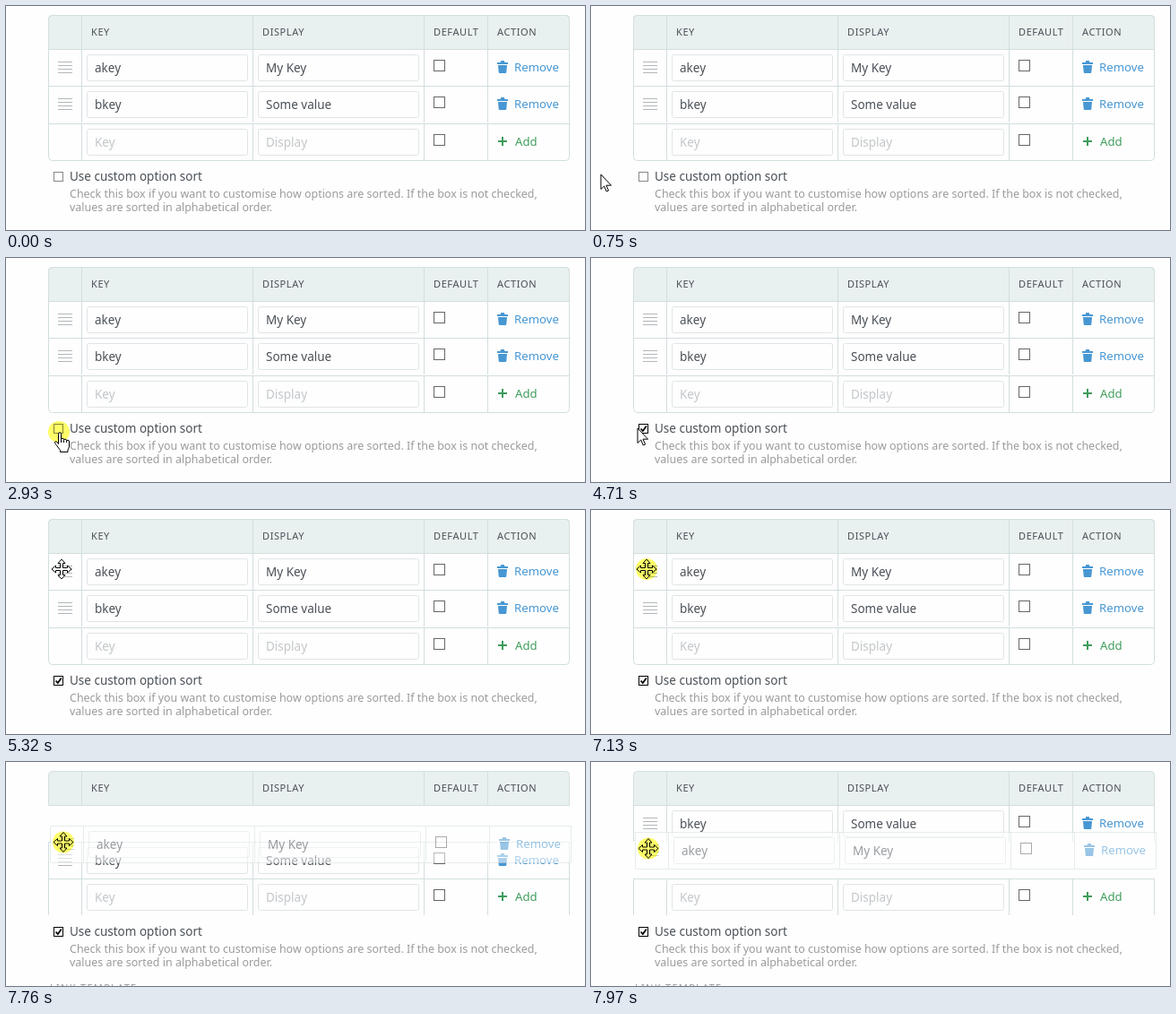
Write an HTML page that moves like this. It is 646x250 px and loops after 8 s.

```html
<!DOCTYPE html>
<html lang="en">
<head>
<meta charset="utf-8">
<title>Sortable options</title>
<style>
html, body { margin: 0; width: 100%; height: 100%; overflow: hidden; background: #fefefe; }
svg { display: block; font: 13.5px "Noto Sans", "Open Sans", sans-serif; fill: #4a5057; }
.line { fill: none; stroke: #d3dedf; }
.head { font-size: 11px; letter-spacing: .6px; }
.field { fill: #fefefe; stroke: #dfe5e6; }
.hint { fill: #c3c7ca; }
.box { fill: #fff; stroke: #666; }
.grip { stroke: #b3b7ba; }
.link { font-size: 13.2px; }
.remove { fill: #4797d3; }
.add { fill: #3f9c5c; }
.help { font-size: 12.48px; fill: #9b9b9b; }
.cursor { fill: #fff; stroke: #000; stroke-linejoin: round; }
#glow { fill: #ffff68; mix-blend-mode: multiply; }
#next { letter-spacing: 1.3px; fill: #999; }
</style>
</head>
<body>
<svg id="stage" width="646" height="250" viewBox="0 0 646 250"></svg>
<script>
const LOOP = 8000;
const COLS = [47.5, 84.5, 275.5, 466.5, 537.5, 628.5];
const $ = id => document.getElementById(id);

const uprights = (xs, top, bottom) => xs.map(x => `M${x} ${top}V${bottom}`).join('');
const field = (x, text, cls) =>
  `<rect class="field" x="${x + .5}" y="6.5" width="179" height="29" rx="2"/>
   <text class="${cls}" x="${x + 9}" y="26">${text}</text>`;

const grip = `<path class="grip" d="M58 14.5h16m-16 4h16m-16 4h16m-16 4h16"/>`;
const removeLink = `<g class="remove link"><path d="M548 15h3.5l.8-2h3.4l.8 2h3.5v2h-12z
  M549 18h10l-.7 8q-.1 1-1.1 1h-6.4q-1 0-1.1-1z"/><text x="567" y="25">Remove</text></g>`;
const addLink = `<g class="add link"><path d="M553 15h2v4h4v2h-4v4h-2v-4h-4v-2h4z"/>
  <text x="568" y="25">Add</text></g>`;

function row(id, key, display, isNew) {
  const cls = isNew ? 'hint' : '';
  return `<g id="${id}">
    ${id === 'rowA' ? '<rect id="sheet" class="line" style="fill:#fff" x="47.5" y=".5" width="581" height="41" rx="2"/>' : ''}
    <path class="line" d="M47.5 .5H628.5${uprights(COLS.slice(1, 5), 0, 41)}"/>
    <path class="line side" d="${uprights([47.5, 628.5], 0, 41)}"/>
    ${isNew ? addLink : grip + removeLink}
    ${field(90, key, cls)}${field(281, display, cls)}
    <rect class="box" x="477.5" y="12.5" width="12" height="12"/>
  </g>`;
}

const heads = ['KEY', 'DISPLAY', 'DEFAULT', 'ACTION']
  .map((s, i) => `<text class="head" x="${COLS[i + 1] + 10.5}" y="33">${s}</text>`).join('');

$('stage').innerHTML = `
  <path class="line" style="fill:#e9f0f0" d="M47.5 48.5V14.5q0-4 4-4H624.5q4 0 4 4V48.5z"/>
  <path class="line" d="${uprights(COLS.slice(1, 5), 11, 48)}"/>${heads}
  ${row('rowB', 'bkey', 'Some value')}
  ${row('rowNew', 'Key', 'Display', true)}
  <g id="below">
    <rect id="box" class="box" x="53.5" y="185.5" width="10" height="10"/>
    <path id="tick" d="M55.5 190.5l2.3 2.5 4-5.5" fill="none" stroke="#000" stroke-width="1.8"/>
    <text x="71" y="195">Use custom option sort</text>
    <text class="help" x="71" y="214">Check this box if you want to customise how options are sorted. If the box is not checked,</text>
    <text class="help" x="71" y="229">values are sorted in alphabetical order.</text>
  </g>
  <text id="next" class="head" x="49" y="256">LINK TEMPLATE</text>
  ${row('rowA', 'akey', 'My Key')}
  <rect id="frame" class="line" x="47.5" y="10.5" width="581" height="162" rx="4"/>
  <path id="move" class="cursor" d="M0-11L4-6.5H1.5V-1.5H6.5V-4L11 0 6.5 4V1.5H1.5V6.5H4L0 11-4 6.5H-1.5V1.5H-6.5V4L-11 0-6.5-4V-1.5H-1.5V-6.5H-4z"/>
  <circle id="glow" r="12"/>
  <path id="arrow" class="cursor" d="M0 0V16.5L3.7 13 6.3 19 8.6 18 6 12.2H11.5z"/>
  <path id="hand" class="cursor" d="M-.5 13.5V2.2Q-.5 .8 1 .8T2.5 2.2V8.5Q2.5 7.3 4 7.3T5.5 8.7V9.3Q5.5 8.2 7 8.2T8.5 9.8V10.4Q8.5 9.3 10 9.3T11.5 11V16Q11.5 18 10 20V22.5H1.5V20.5L-3 14.5Q-5.5 11.5-3.8 10.7-2.5 10.2-.5 13.5zM2.5 8.5V12M5.5 9.5V12M8.5 10.5V12"/>`;

const sides = document.querySelectorAll('.side');
const show = (el, on) => { el.style.display = on ? '' : 'none'; };
const place = (id, x, y) => $(id).setAttribute('transform', `translate(${x} ${y})`);
const smooth = p => p * p * (3 - 2 * p);
const bend = (a, b, c, p) => (1 - p) ** 2 * a + 2 * p * (1 - p) * b + p * p * c;

function pointer(t, step) {
  if (t < 500) return ['', 0, 0];
  if (t < 1320) {
    const p = smooth(Math.min(11, Math.floor((t - 500) / 73) + 1) / 11);
    return ['arrow', Math.round(-10 + 69 * p), Math.round(184 + 12 * p)];
  }
  if (t < 4710) return ['hand', 59, 194];
  if (t < 5320) {
    const p = smooth((Math.floor((t - 4710) / 67.8) + 1) / 10);
    return ['arrow', Math.round(bend(59, -62, 62, p)), Math.round(bend(194, 130, 66, p))];
  }
  const x = 62 + Math.round(Math.max(0, step) / 5);
  if (step < 7) {
    return [step === 5 || step === 6 ? 'arrow' : 'move', x, Math.round(66 + 14 * Math.max(0, step) / 6)];
  }
  return ['move', x, dragTop(step) + 18.5];
}

const dragTop = step => Math.floor(71.01 + (step - 9) * 7 / 3);

function draw(t) {
  const step = Math.floor((t - 7130) / 70);
  const dragging = step >= 7;
  const [shape, x, y] = pointer(t, step);

  for (const id of ['move', 'arrow', 'hand']) {
    show($(id), id === shape);
    place(id, x, y);
  }
  show($('glow'), (t >= 2930 && t < 3080) || step >= 0);
  place('glow', x, y);

  const checked = t >= 3080;
  show($('tick'), checked);
  $('box').style.stroke = checked ? '#000' : '#888';

  place('rowA', dragging ? 2 : 0, dragging ? dragTop(step) : 48);
  $('rowA').style.opacity = dragging ? .55 : 1;
  place('rowB', 0, step >= 10 ? 48 : 89);
  place('rowNew', 0, dragging ? 130 : 131);
  place('below', 0, dragging ? -1 : 0);

  show($('frame'), !dragging);
  for (const el of [$('sheet'), $('next'), ...sides]) show(el, dragging);
}

function tick() {
  draw(performance.now() % LOOP);
  requestAnimationFrame(tick);
}
tick();
</script>
</body>
</html>
```
